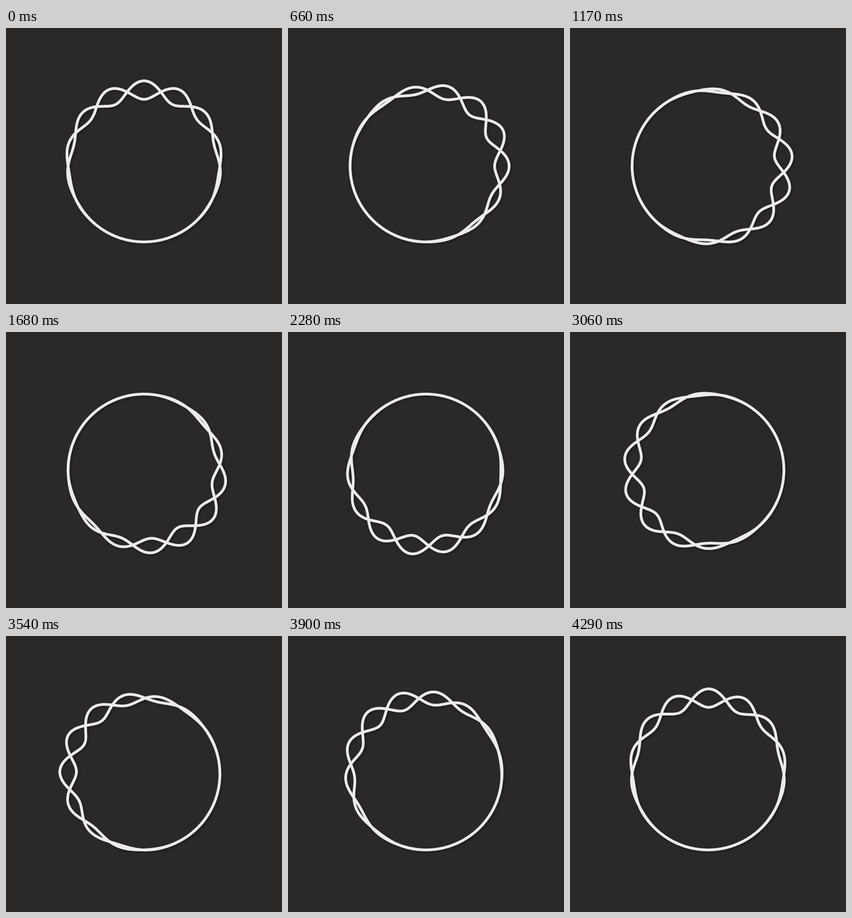
Animation of 500 by 500 pixels, one loop 4.32 s. Source, as an HTML page with a canvas:

```html
<!DOCTYPE html>
<html lang="en">
<head>
<meta charset="utf-8">
<title>Braided ring</title>
<style>
  html, body { margin: 0; width: 100%; height: 100%; overflow: hidden; background: #2a2928; }
  canvas { display: block; width: 500px; height: 500px; }
</style>
</head>
<body>
<canvas id="stage" width="500" height="500"></canvas>
<script>
const ctx = document.getElementById('stage').getContext('2d');
const LOOP = 4320, STEP = 30;
const CENTER = 250, RADIUS = 137.5, SWING = 16.7;
const WAVES = 7, POINTS = 720, TAU = Math.PI * 2;

// Angles run clockwise from the top of the ring.
function addStrand(path, t, side) {
  for (let i = 0; i < POINTS; i++) {
    const a = i / POINTS * TAU;
    // The swell travels clockwise while its ripples drift the other way.
    const swell = Math.abs(Math.cos((a - t * TAU) / 2)) ** 5;
    const r = RADIUS + side * SWING * swell * Math.cos(WAVES * a + 3 * Math.PI * t);
    path.lineTo(CENTER + r * Math.sin(a), CENTER - r * Math.cos(a));
  }
  path.closePath();
}

function draw(t) {
  ctx.shadowColor = 'transparent';
  ctx.fillStyle = '#2a2928';
  ctx.fillRect(0, 0, 500, 500);

  const path = new Path2D();
  for (const side of [1, -1]) {
    const strand = new Path2D();
    addStrand(strand, t, side);
    path.addPath(strand);
  }
  ctx.lineWidth = 5;
  ctx.lineJoin = 'round';
  ctx.strokeStyle = '#ebebe9';
  ctx.shadowColor = 'rgba(0, 0, 0, 0.35)';
  ctx.shadowBlur = 4;
  ctx.shadowOffsetX = ctx.shadowOffsetY = 2;
  ctx.stroke(path);
}

function tick() {
  const ms = performance.now() % LOOP;
  draw(Math.floor(ms / STEP) * STEP / LOOP);
  requestAnimationFrame(tick);
}
tick();
</script>
</body>
</html>
```
